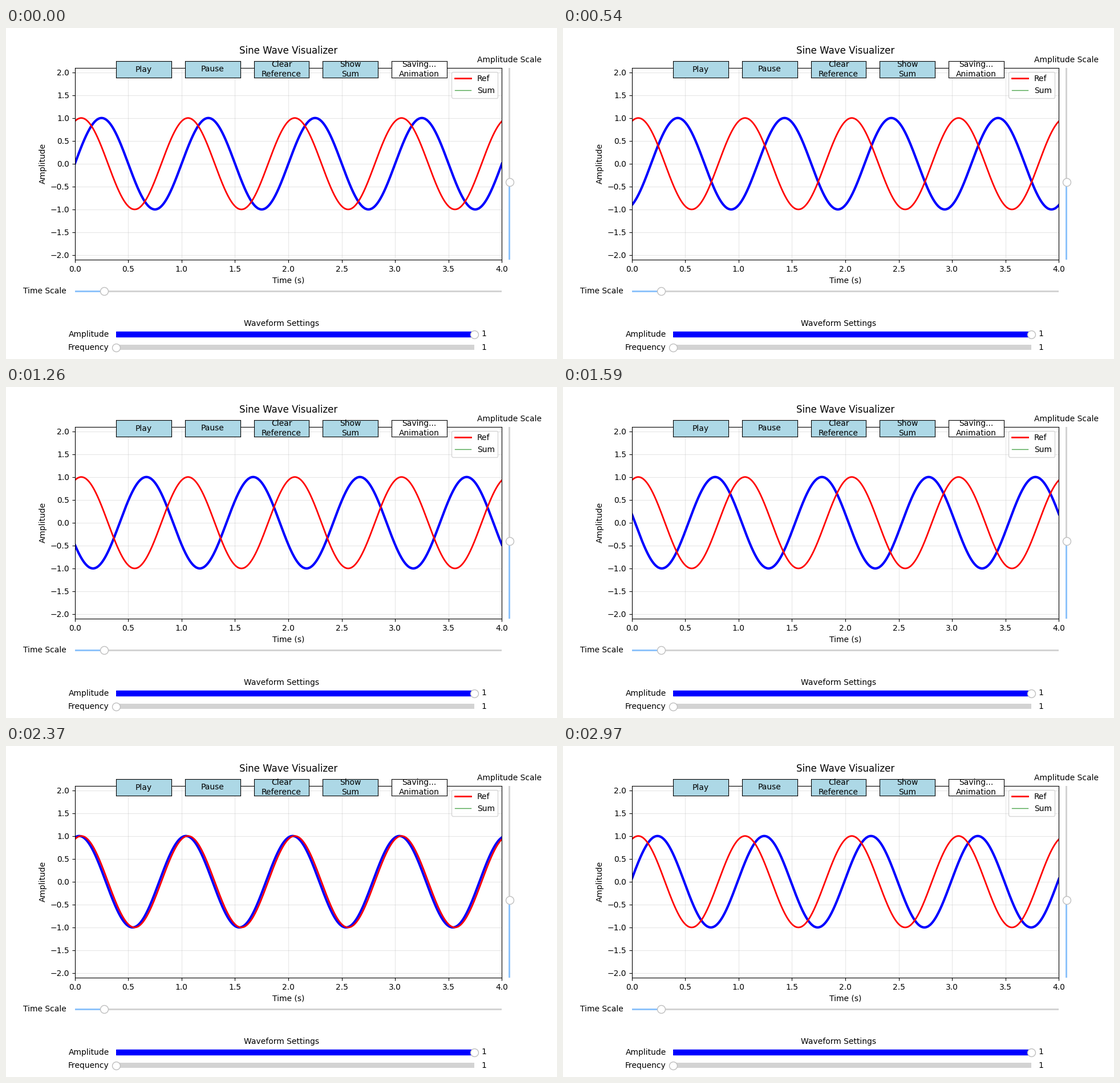
Recreate the animation shown at these times as a matplotlib script. Size 966 px wide and 580 px high, loop 3000 ms.

```python
import numpy as np
import matplotlib.pyplot as plt
from matplotlib.animation import FuncAnimation
from matplotlib.widgets import Button, Slider

FRAMES = 100
INTERVAL = 30
REF_SHIFT = 0.81
SKY = "#8fc3fb"

fig, ax = plt.subplots(figsize=(9.66, 5.8), dpi=100)
fig.subplots_adjust(left=0.125, right=0.9, bottom=0.3, top=0.88)

t = np.linspace(0, 4, 1000)


def wave(shift):
    return np.sin(2 * np.pi * (t - shift))


live, = ax.plot(t, wave(0), color="blue", lw=3)
ax.plot(t, wave(REF_SHIFT), color="red", lw=2, label="Ref")
ax.plot([], [], color="green", lw=1, alpha=0.7, label="Sum")
ax.set(xlim=(0, 4), ylim=(-2.1, 2.1), xlabel="Time (s)", ylabel="Amplitude")
ax.set_title("Sine Wave Visualizer", pad=18)
ax.grid(True, alpha=0.3)
ax.legend(loc="upper right")


def add_button(i, label, color="lightblue"):
    box = fig.add_axes([0.2 + 0.125 * i, 0.85, 0.1, 0.05])
    return Button(box, label, color=color, hovercolor=color)


def add_slider(rect, label, low, high, value, show_value=False, **style):
    slider = Slider(fig.add_axes(rect), label, low, high, valinit=value,
                    valfmt="%d", initcolor="none", **style)
    slider.valtext.set_visible(show_value)
    return slider


buttons = [
    add_button(0, "Play"),
    add_button(1, "Pause"),
    add_button(2, "Clear\nReference"),
    add_button(3, "Show\nSum"),
    add_button(4, "Saving...\nAnimation", "white"),
]

sliders = [
    add_slider([0.125, 0.2, 0.775, 0.01], "Time Scale", 1, 60, 5,
               facecolor=SKY),
    add_slider([0.911, 0.3, 0.006, 0.58], "Amplitude Scale", 0, 1, 0.4035,
               orientation="vertical", facecolor=SKY),
    add_slider([0.2, 0.06, 0.65, 0.03], "Amplitude", 0, 1, 1, True,
               color="blue"),
    add_slider([0.2, 0.02, 0.65, 0.03], "Frequency", 1, 10, 1, True,
               facecolor="blue"),
]
fig.text(0.5, 0.1, "Waveform Settings", ha="center")


def update(frame):
    live.set_ydata(wave(frame / FRAMES))
    return live,


anim = FuncAnimation(fig, update, frames=FRAMES, interval=INTERVAL,
                     repeat=True, repeat_delay=0, blit=False)
plt.show()
```
